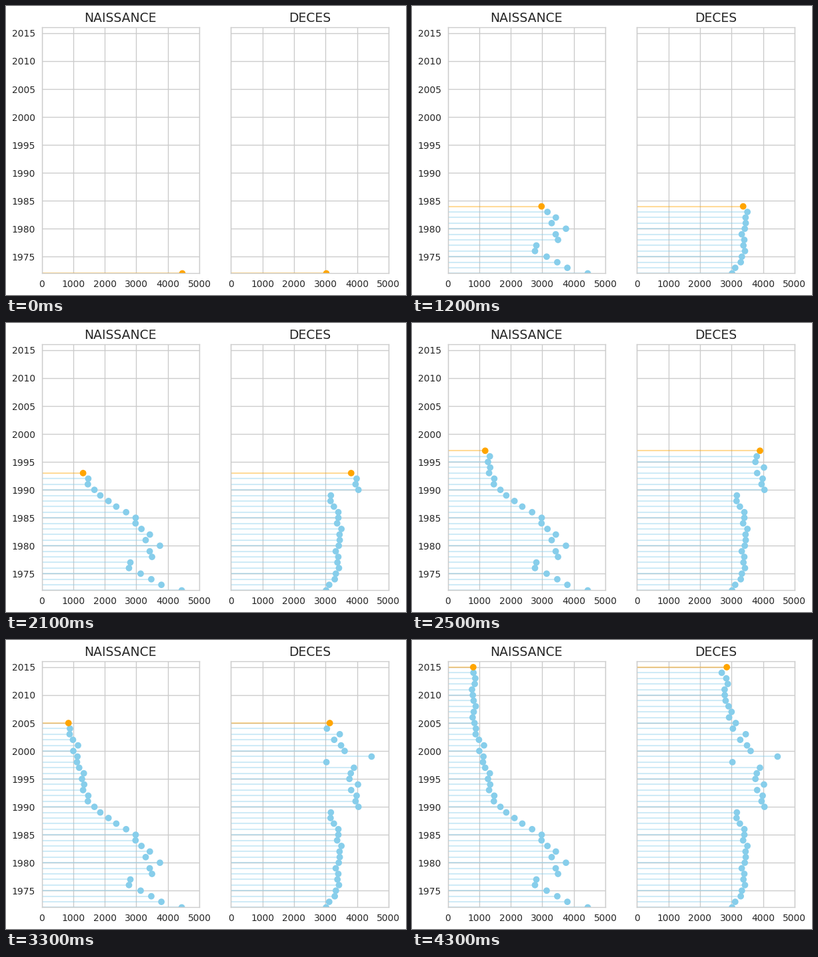
These frames come from a looping animation (600x435 px, 4.4 s). A matplotlib script:

```python
import numpy as np
import matplotlib.pyplot as plt
from matplotlib.animation import FuncAnimation
from matplotlib.colors import to_rgba

W, H, DPI = 600, 435, 100
FIRST, LAST = 1972, 2015
YEARS = np.arange(FIRST, LAST + 1)

BIRTHS = [4440, 3795, 3475, 3138, 2768, 2812, 3498, 3425, 3750, 3297, 3430,
          3163, 2975, 2980, 2677, 2365, 2118, 1858, 1672, 1465, 1477, 1313,
          1347, 1278, 1337, 1189, 1119, 1134, 1003, 1152, 992, 887, 897, 850,
          791, 827, 890, 823, 797, 772, 858, 875, 818, 811]
DEATHS = [3018, 3117, 3293, 3329, 3426, 3378, 3405, 3325, 3420, 3451, 3445,
          3504, 3369, 3407, 3407, 3266, 3160, 3170, 4044, 3953, 3987, 3813,
          4029, 3758, 3801, 3902, 3029, 4460, 3606, 3492, 3276, 3452, 3044,
          3135, 2923, 3002, 2907, 2814, 2786, 2782, 2882, 2835, 2691, 2850]

plt.rcParams["font.family"] = "DejaVu Sans"
INK, GRID = "0.15", "0.8"
BLUE, ORANGE = "skyblue", "orange"

# the small margin keeps the pixel size from rounding down
fig = plt.figure(figsize=((W + 0.01) / DPI, (H + 0.01) / DPI), dpi=DPI,
                 facecolor="white")


def make_panel(left, title, years_shown):
    ax = fig.add_axes([left / W, 1 - 402.5 / H, 236.6 / W, 370 / H])
    ax.set_xlim(0, 5000)
    ax.set_ylim(FIRST, LAST + 1)
    ax.set_xticks(range(0, 5001, 1000))
    ax.set_yticks(range(1975, LAST + 1, 5))
    ax.grid(color=GRID, lw=1)
    ax.set_axisbelow(True)
    ax.tick_params(length=0, pad=7, labelsize=10, labelcolor=INK,
                   labelleft=years_shown)
    for spine in ax.spines.values():
        spine.set(color=GRID, linewidth=1)
    ax.set_title(title, fontsize=13.5, color=INK, pad=6)
    stems = ax.hlines([], 0, [], lw=1.5, alpha=0.4)
    dots = ax.scatter([], [], s=36, linewidths=1, zorder=1)
    return stems, dots


panels = [(*make_panel(53.5, "NAISSANCE", True), np.array(BIRTHS)),
          (*make_panel(337.3, "DECES", False), np.array(DEATHS))]


def draw(i):
    years = YEARS[:i + 1]
    colors = [to_rgba(BLUE)] * i + [to_rgba(ORANGE)]
    artists = []
    for stems, dots, data in panels:
        values = data[:i + 1]
        stems.set_segments([[(0, y), (v, y)] for v, y in zip(values, years)])
        stems.set_color(colors)
        dots.set_offsets(np.column_stack([values, years]))
        dots.set_facecolor(colors)
        dots.set_edgecolor(colors)
        artists += [stems, dots]
    return artists


anim = FuncAnimation(fig, draw, frames=len(YEARS), init_func=lambda: draw(0),
                     interval=100, repeat=True, repeat_delay=0, blit=False)
plt.show()
```
